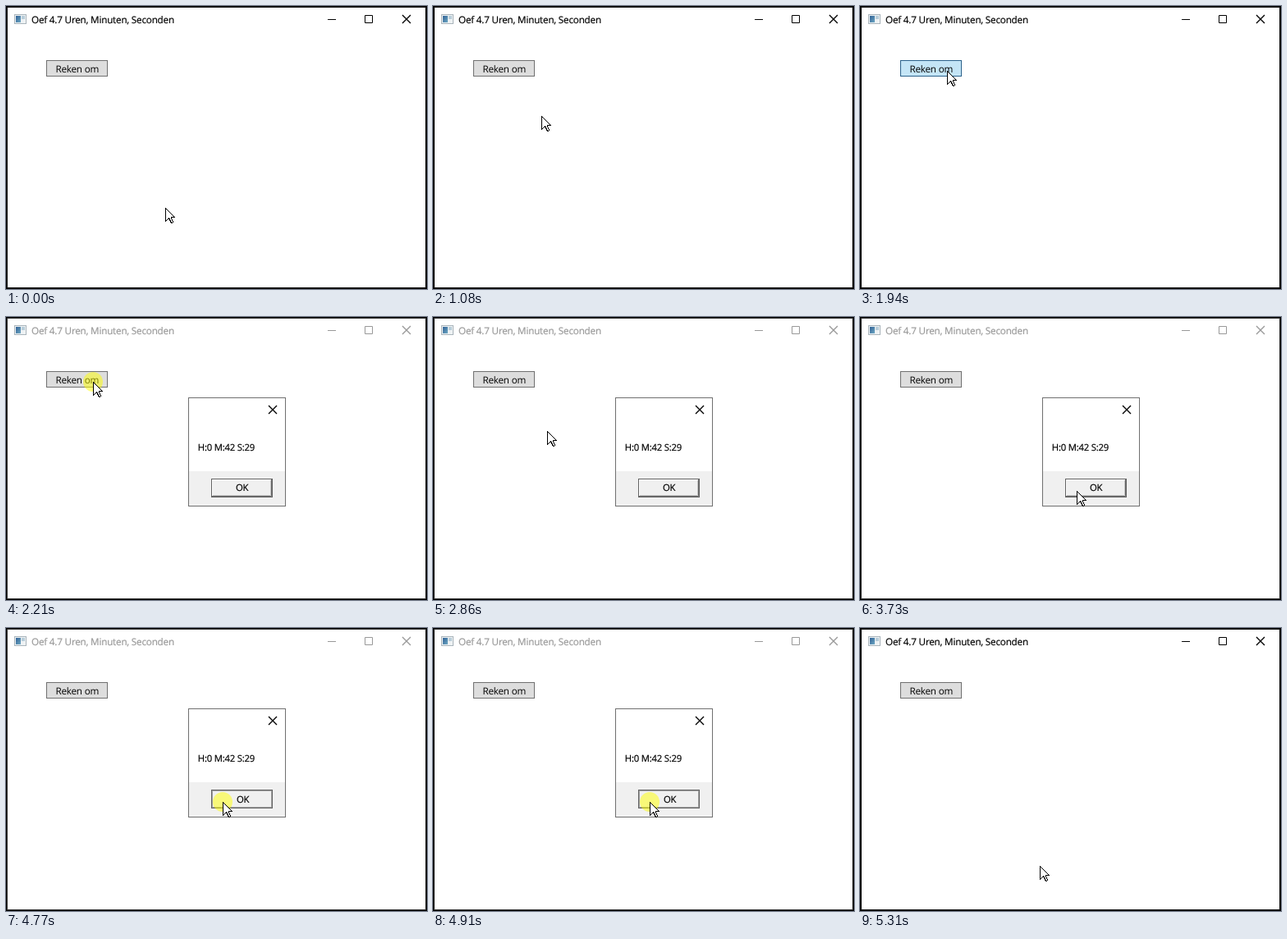
Write an HTML page that moves like this. It is 513x345 px and loops after 6660 ms.

```html
<!DOCTYPE html>
<html lang="nl">
<head>
<meta charset="utf-8">
<style>
  html, body { margin: 0; height: 100%; overflow: hidden; background: #fff; }
  svg { display: block; color: #000; }
  text {
    font: 11.7px "Open Sans", "Noto Sans", sans-serif; letter-spacing: -.2px;
    text-rendering: geometricPrecision; fill: currentColor;
  }
  .bold { stroke: currentColor; stroke-width: .2; }
  .line { fill: none; stroke: currentColor; }
  .cross { stroke-width: 1.4; }
  .inactive #bar { color: #999; }
  .inactive #edge { stroke: #333; }
  #edge { fill: none; stroke: #111; }
  #calc { fill: #ddd; stroke: #707070; }
  #calc.hover { fill: #bee6fd; stroke: #3c7fb1; }
  #calc.pressed { fill: #c4e5f6; stroke: #2c628b; }
  #dialog text { font-size: 11.3px; }
</style>
</head>
<body>
<svg id="stage" width="513" height="345" viewBox="0 0 513 345">
  <defs>
    <linearGradient id="pane" x2="1" y2="1">
      <stop stop-color="#2f5f94"/><stop offset="1" stop-color="#6fa9c4"/>
    </linearGradient>
  </defs>
  <rect width="513" height="345" fill="#fff"/>
  <rect class="line" x=".5" y=".5" width="512" height="344"/>
  <rect id="edge" x="1.5" y="1.5" width="510" height="342"/>

  <rect x="10.5" y="10.5" width="14" height="11" fill="#eef2f4" stroke="#a9b4bb"/>
  <rect x="12" y="12" width="6" height="8" fill="url(#pane)"/>
  <path d="M19 12h4v4h-4z" fill="#b8cdd9"/>
  <g id="bar">
    <text class="bold" x="31" y="21">Oef 4.7 Uren, Minuten, Seconden</text>
    <path class="line" d="M392 16.5h10M437.5 11.5h9v9h-9z"/>
    <path class="line cross" d="M483 11l10 10M493 11l-10 10"/>
  </g>

  <rect id="calc" x="49.5" y="66.5" width="74" height="19"/>
  <text x="60.4" y="80.8">Reken om</text>

  <g id="dialog">
    <rect x="222.5" y="98.5" width="118" height="132" fill="#fff" stroke="#707070"/>
    <path d="M223 188h117v42H223z" fill="#f0f0f0"/>
    <path class="line cross" d="M320 108l10 10M330 108l-10 10"/>
    <text class="bold" x="233.8" y="163">H:0 M:42 S:29</text>
    <rect x="250.5" y="197.5" width="74" height="22" fill="#f0f0f0" stroke="#646464"/>
    <g id="raised" fill="none">
      <path d="M251.5 218V198.5H323" stroke="#fff"/>
      <path d="M251 218.5H323.5V198" stroke="#696969"/>
      <path d="M252 217.5H322.5V199" stroke="#c4c4c4"/>
    </g>
    <rect id="sunken" x="251.5" y="198.5" width="72" height="20" fill="none" stroke="#a0a0a0"/>
    <text class="bold" id="ok" x="280" y="212">OK</text>
  </g>

  <circle id="glow" r="12" fill="#ff0" opacity=".5"/>
  <path id="cursor" fill="#fff" stroke="#000" stroke-linejoin="round" shape-rendering="crispEdges"
    d="M.5 .5V16.5L4.5 12.5 7.5 18.5H8.5L9.5 17.5 7.5 12.5V11.5H11.5Z"/>
</svg>
<script>
const LOOP = 6660;
const HOME = [194, 246];
const $ = id => document.getElementById(id);

// pointer moves: first and last change, number of changes, bend point, end point
const moves = [
  [690, 1340, 9, [155, 175], [110, 94]],
  [1400, 1720, 5, [107, 85], [106, 79]],
  [2590, 3250, 9, [137, 163], [213, 193]],
  [3330, 3730, 6, [238, 204], [264, 212]],
  [5000, 5310, 5, [250, 246], [219, 290]]
];

const ease = u => (1 - Math.cos(Math.PI * u)) / 2;
const bend = (a, b, c, s) => (1 - s) ** 2 * a + 2 * s * (1 - s) * b + s * s * c;

function pointer(t) {
  let pos = HOME;
  for (const [from, to, steps, via, end] of moves) {
    if (t < from) break;
    const step = 1 + Math.round((t - from) / (to - from) * (steps - 1));
    const s = ease(Math.min(1, step / steps));
    pos = pos.map((a, i) => Math.round(bend(a, via[i], end[i], s)));
  }
  return pos;
}

const show = (id, on) => $(id).setAttribute('visibility', on ? 'inherit' : 'hidden');
const place = (id, x, y) => $(id).setAttribute('transform', `translate(${x} ${y})`);

function draw(t) {
  const within = (from, to) => t >= from && t < to;
  const [x, y] = pointer(t);
  const open = within(2190, 4920);
  const okDown = within(4770, 4920);
  const hover = y < 86 && t < 2190;

  place('cursor', x, y);
  place('glow', x, y);
  show('glow', within(2020, 2280) || within(4770, 5000));

  $('calc').setAttribute('class', within(1940, 2100) ? 'pressed' : hover ? 'hover' : '');
  $('stage').setAttribute('class', open ? 'inactive' : '');
  show('dialog', open);
  show('raised', open && !okDown);
  show('sunken', okDown);
  place('ok', +okDown, +okDown);
}

const start = performance.now();
function tick() {
  draw((performance.now() - start) % LOOP);
  requestAnimationFrame(tick);
}
tick();
</script>
</body>
</html>
```
